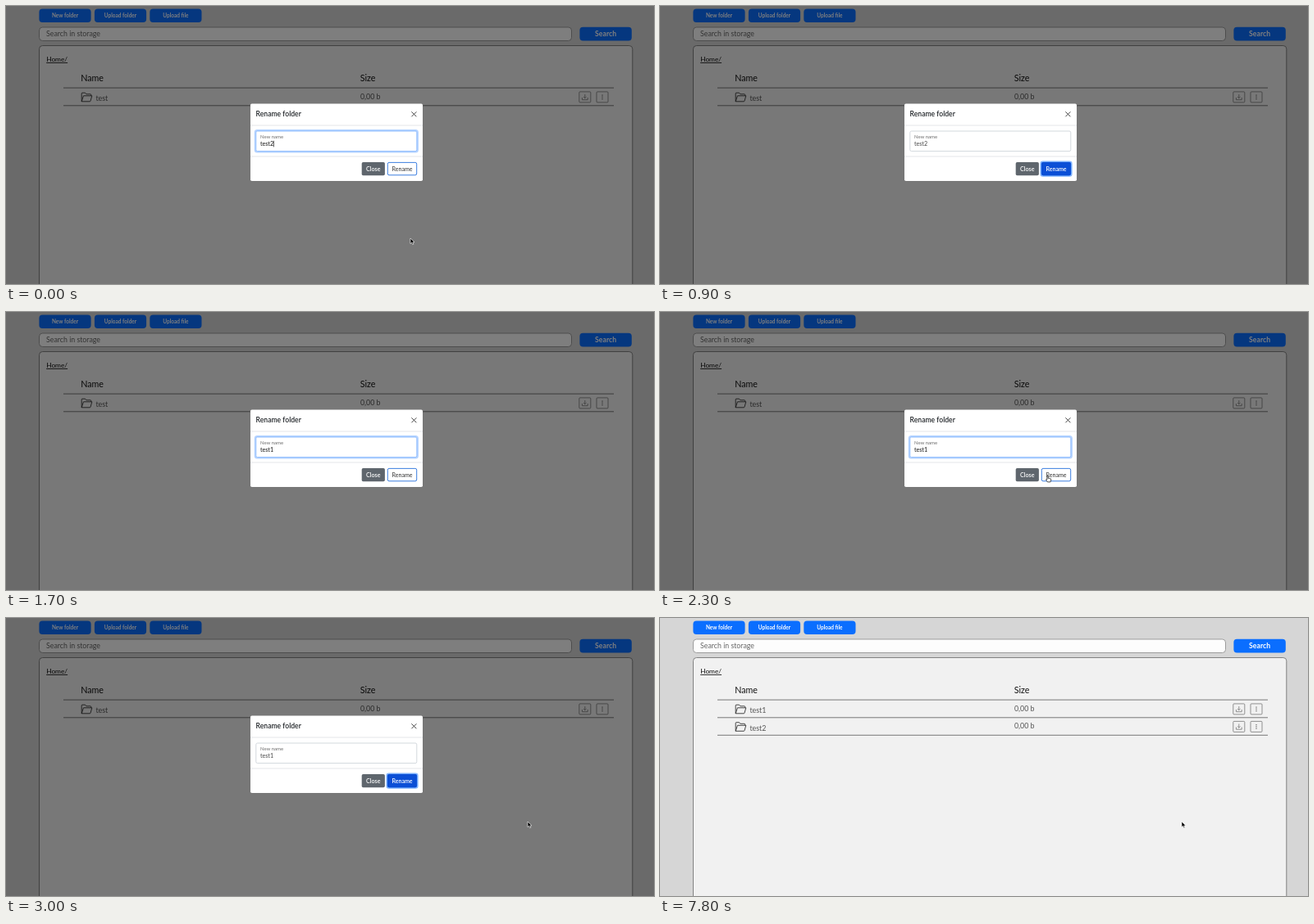
These frames come from a looping animation (790x340 px, 8 s). An HTML page:

```html
<!DOCTYPE html>
<html lang="en">
<head>
<meta charset="utf-8">
<title>Rename folder</title>
<style>
  html, body { margin: 0; width: 100%; height: 100%; overflow: hidden; background: #d6d6d6; }
  svg { display: block; font-family: Lato, "Open Sans", sans-serif; }
</style>
</head>
<body>
<svg id="stage" width="790" height="340" viewBox="0 0 790 340"></svg>
<script>
const LOOP = 8000, STEP = 100;
const BLUE = '#0a6eff', PRESSED = '#0b4fd6';
const stage = document.getElementById('stage');

const rect = (x, y, w, h, attrs = '') =>
  `<rect x="${x}" y="${y}" width="${w}" height="${h}" ${attrs}/>`;
const text = (x, y, size, label, attrs = '') =>
  `<text x="${x}" y="${y}" font-size="${size}" ${attrs}>${label}</text>`;
const line = (x1, x2, y, color) =>
  `<path d="M${x1} ${y}H${x2}" stroke="${color}"/>`;
const centered = 'text-anchor="middle"';
const clamp = v => Math.max(0, Math.min(1, v));

const blueButton = (x, y, w, size, label) =>
  rect(x, y, w, 16.6, `rx="4" fill="${BLUE}"`) +
  text(x + w / 2, y + 8.3 + size * .36, size, label, `${centered} font-weight="700" fill="#fff"`);

const row = (name, y) => `<g transform="translate(0 ${y})">
  <path d="M92.2 16.6V6.8q0-.8.8-.8h3.6l1.3 1.6h5q.8 0 .8.8v1.2M92.2 16.6l2.3-7h10.3l-1.8 6.4q-.2.6-.9.6z"
    fill="none" stroke="#333" stroke-width=".9" stroke-linejoin="round"/>
  ${text(109.4, 16, 8.9, name, 'fill="#555"')}
  ${text(432, 13.8, 8.8, '0,00 b', 'fill="#555"')}
  <g fill="none" stroke="#777" stroke-width=".8">
    ${rect(698.8, 4.7, 14, 13, 'rx="1"')}${rect(720, 4.7, 14, 13, 'rx="1"')}
    <path d="M702.4 11.8v2.7h6.8v-2.7M705.8 7.8v4.6m-1.7-1.6l1.7 1.7 1.7-1.7"/>
    <path d="M727 8.4v1.2m0 1v1.2m0 1v1.2" stroke="#555" stroke-width="1.1"/>
  </g>
  ${line(70, 741, 21.6, '#777')}</g>`;

const page = names =>
  rect(0, 0, 790, 400, 'fill="#d6d6d6"') +
  blueButton(40.4, 3.5, 63.2, 6.5, 'New folder') +
  blueButton(107.9, 3.5, 63.2, 6.5, 'Upload folder') +
  blueButton(175.3, 3.5, 63.2, 6.5, 'Upload file') +
  rect(40.5, 26, 649, 16.5, 'rx="4" fill="#fdfdfd" stroke="#888" stroke-width=".8"') +
  text(49, 37.2, 8.8, 'Search in storage', 'fill="#666"') +
  blueButton(699.4, 25.8, 63.4, 8.7, 'Search') +
  rect(40.5, 48.5, 723.3, 303, 'rx="4" fill="#f1f1f1" stroke="#777" stroke-width=".9"') +
  text(49.2, 68, 8.3, 'Home/', 'fill="#111" text-decoration="underline"') +
  text(91.2, 91.8, 10.7, 'Name', 'fill="#111"') +
  text(431.8, 91.8, 10.7, 'Size', 'fill="#111"') +
  line(70, 741, 100.1, '#777') +
  names.map((name, i) => row(name, 100.2 + i * 21.5)).join('');

// focus: glow of the input, hover: fill of Rename, ring: glow of Rename
const dialog = ({ name, focus, hover, ring, caret }) =>
  rect(298, 119.5, 210, 94.5, 'rx="1.8" fill="#fff"') +
  text(304.6, 135.2, 8.6, 'Rename folder', 'font-weight="600" fill="#212529"') +
  '<path d="M494.4 129.3l6 6m0-6l-6 6" stroke="#444" stroke-width="1"/>' +
  line(298, 508, 146, '#e4e6e9') + line(298, 508, 184, '#e4e6e9') +
  rect(303.7, 152, 198.2, 26.6, `rx="2.5" fill="none" stroke="#0d6efd" stroke-width="2" opacity="${focus * .3}"`) +
  rect(304.8, 153, 196, 24.6, `rx="1.8" fill="#fff" stroke="${focus ? '#86b7fe' : '#ced4da'}" stroke-width=".9"`) +
  text(310, 162.2, 6, 'New name', 'fill="#6c6c6c"') +
  text(310, 171.1, 7.1, name, `fill="${focus === 1 ? '#111' : '#444'}"`) +
  (caret ? rect(325.9, 164.8, .7, 7.6, 'fill="#111"') : '') +
  rect(433.7, 191, 28.2, 16.2, 'rx="1.8" fill="#5f666d"') +
  text(447.8, 201.6, 7.2, 'Close', `${centered} font-weight="600" fill="#fff"`) +
  rect(464.3, 190.3, 37.4, 17.6, `rx="2.4" fill="none" stroke="#3184fd" stroke-width="1.8" opacity="${ring * .6}"`) +
  rect(465.3, 191.4, 35.4, 15.4, 'rx="1.8" fill="#fff" stroke="#0b5ed7" stroke-width=".8"') +
  rect(465, 191, 36, 16.2, `rx="1.8" fill="${PRESSED}" opacity="${hover}"`) +
  text(483, 201.6, 7.1, 'Rename', `${centered} ${hover > .5 ? 'font-weight="600" fill="#fff"' : 'fill="#333"'}`);

const modalScene = state =>
  page(['test']) + rect(0, 0, 790, 400, 'opacity=".5"') + dialog(state);

// Small preview of the other window hanging from the top edge
const preview = () => `
  <clipPath id="previewClip">${rect(147, -10, 126.5, 73.3)}</clipPath>
  ${rect(142, -20, 136, 88, 'rx="6" fill="#000" opacity=".15"')}
  ${rect(143.6, -20, 133.4, 87, 'rx="5" fill="#484851"')}
  <g clip-path="url(#previewClip)"><g transform="translate(146.4 -9.7) scale(.19)">
    ${modalScene({ name: 'test1', focus: 1, hover: 0, ring: 0 })}</g></g>`;

// [time, tip x, tip y, shape]
const firstMove = [[0, 493, 284, 'arrow'], [200, 489, 256, 'arrow'], [400, 477, 204, 'hand'],
  [500, 476, 205, 'hand'], [600, 476, 211, 'hand'], [700, 504, 236, 'arrow'], [800, 530, 256, 'arrow']];
const secondMove = [[1900, 488, 223, 'arrow'], [2100, 480, 212, 'arrow'], [2300, 472.6, 200.4, 'hand'],
  [2500, 473, 200, 'hand'], [2600, 492, 206, 'arrow'], [2700, 580, 232, 'arrow'], [2800, 636, 249, 'arrow']];

const shapes = {
  arrow: '<path d="M0 0V6.7L1.6 5.3 2.7 7.8 3.9 7.3 2.8 4.9H5z" fill="#000" stroke="#fff" stroke-width=".6"/>',
  hand: '<path d="M-.7.6Q0-.4.6.6V3Q1.4 2.4 1.9 3.1 2.8 2.7 3.1 3.4 4.1 3.2 4.1 4.2 4.2 6 3.3 7.5H-.1Q-1 6.2-2 4.8-2.1 3.6-.7 4.5z" fill="#fff" stroke="#000" stroke-width=".7"/>'
};

function cursor(path, t) {
  const i = path.findLastIndex(key => key[0] <= t);
  if (i < 0) return '';
  const [t0, x0, y0, shape] = path[i];
  const [t1, x1, y1] = path[i + 1] || [t0 + 1, x0, y0];
  const k = clamp((t - t0) / (t1 - t0));
  return `<g transform="translate(${x0 + (x1 - x0) * k} ${y0 + (y1 - y0) * k})">${shapes[shape]}</g>`;
}

function scene(t) {
  if (t >= 7800) return page(['test1', 'test2']) + cursor(secondMove, t);
  const second = t >= 1700;
  const click = second ? 2600 : 600;
  const state = {
    name: second ? 'test1' : 'test2',
    focus: t < click ? 1 : t < click + 100 ? .45 : 0,
    hover: clamp((t - click + 200) / 100),
    ring: t > click ? 1 : 0,
    caret: t < 400
  };
  const pointer = second ? cursor(secondMove, t) : t < 900 ? cursor(firstMove, t) : '';
  return modalScene(state) + (t >= 1500 && !second ? preview() : '') + pointer;
}

let shown = -1;
function draw() {
  const t = Math.floor(performance.now() % LOOP / STEP) * STEP;
  if (t !== shown) stage.innerHTML = scene(shown = t);
  requestAnimationFrame(draw);
}
draw();
</script>
</body>
</html>
```
